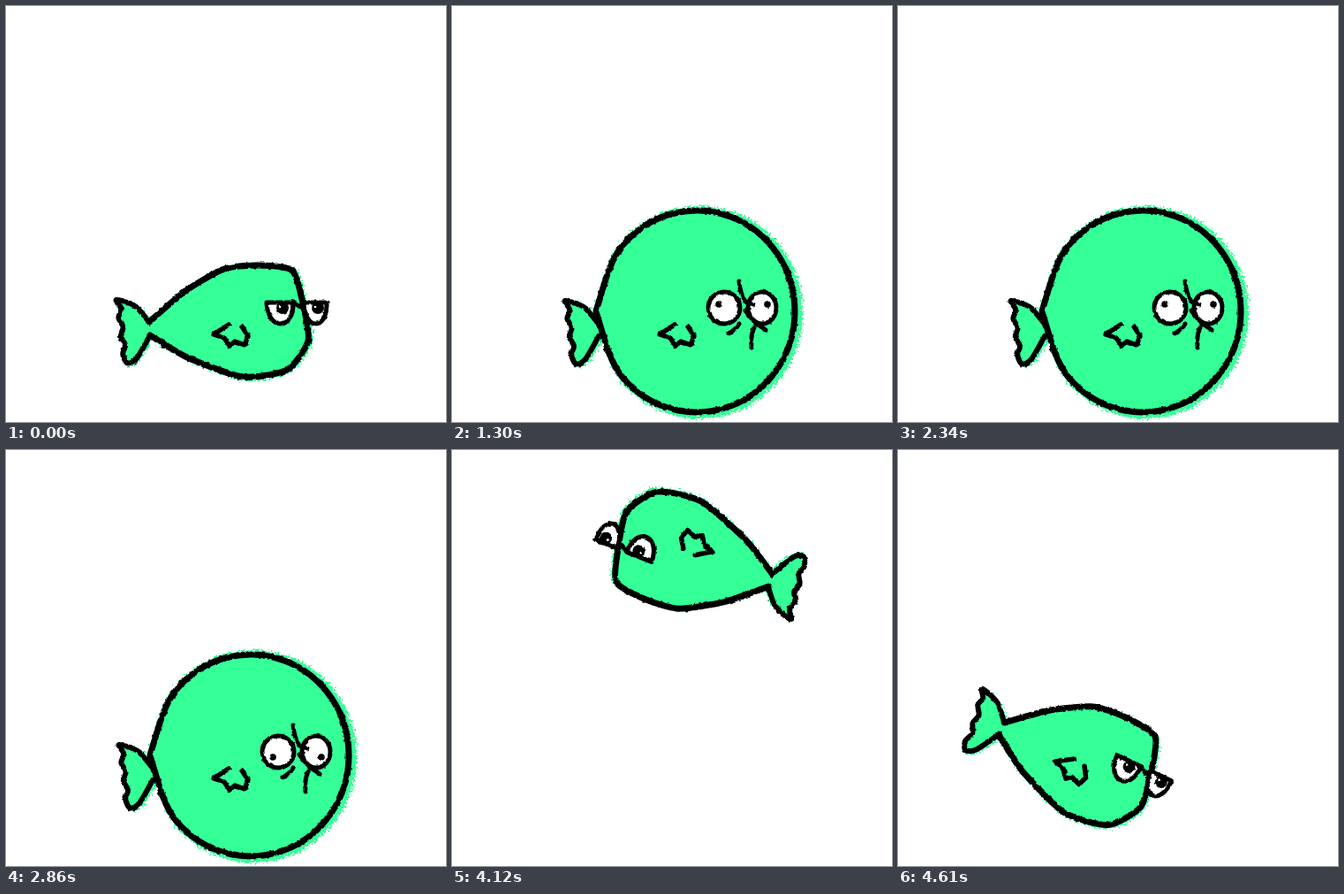
Write an HTML page that moves like this. It is 498x470 px and loops after 4.68 s.

```html
<!DOCTYPE html>
<html lang="en">
<head>
<meta charset="utf-8">
<title>Puffing fish</title>
<style>
html, body { margin: 0; width: 100%; height: 100%; overflow: hidden; background: #fff; }
svg { display: block; }
</style>
</head>
<body>
<svg width="498" height="470" viewBox="0 0 498 470">
  <defs>
    <filter id="fuzz" filterUnits="userSpaceOnUse" x="0" y="0" width="498" height="470" color-interpolation-filters="sRGB">
      <feTurbulence type="fractalNoise" baseFrequency=".4" numOctaves="2"/>
      <feDisplacementMap in="SourceGraphic" scale="11" xChannelSelector="R" yChannelSelector="G"/>
    </filter>
    <filter id="ink" filterUnits="userSpaceOnUse" x="0" y="0" width="498" height="470" color-interpolation-filters="sRGB">
      <feTurbulence type="fractalNoise" baseFrequency=".2" numOctaves="2"/>
      <feDisplacementMap in="SourceGraphic" scale="3" xChannelSelector="R" yChannelSelector="G"/>
    </filter>
  </defs>
  <g filter="url(#fuzz)"><g id="paint"></g></g>
  <g filter="url(#ink)" stroke-linecap="round" stroke-linejoin="round"><g id="lines"></g></g>
</svg>
<script>
const GREEN = '#35ff97', LOOP = 4680, FLIGHT = 3770, REST_STEPS = 29, FLIGHT_STEPS = 13;
const $ = id => document.getElementById(id);
const RAD = Math.PI / 180;

// Clockwise from the upper to the lower tail joint.
const slimBody = [[162,357], [203,322], [247,297], [286,293], [324,299], [336,336],
  [342,378], [318,411], [268,419], [205,397], [163,372]];
const puffBody = slimBody.map((_, i) => {
  const a = (186 + 348 * i / (slimBody.length - 1)) * RAD;
  return [277 + 111 * Math.cos(a), 345 + 114 * Math.sin(a)];
});
const frill = Array.from({ length: 8 }, (_, i) => [126 + 1.2 * i + (i % 2 ? 3 : -1), 332 + 10.2 * i]);
const tailPoints = [[162,357], [146,339], ...frill, [148,398], [163,372]];

const mix = (a, b, k) => a + (b - a) * k;
const wobble = (pts, amp) => pts.map((p, i) => p.map((v, j) => v + amp * Math.sin(i * 5.3 + j * 2.1 + 1)));

function curve(pts, closed, ease = 1 / 7) {
  const n = pts.length;
  const at = i => closed ? pts[(i + n) % n] : pts[Math.max(0, Math.min(n - 1, i))];
  let d = 'M' + pts[0];
  for (let i = 0; i < n - !closed; i++) {
    const [a, b, c, e] = [at(i - 1), at(i), at(i + 1), at(i + 2)];
    const p = b.map((v, j) => v + (c[j] - a[j]) * ease);
    const q = c.map((v, j) => v - (e[j] - b[j]) * ease);
    d += `C${p} ${q} ${c}`;
  }
  return d + (closed ? 'Z' : '');
}

const path = (d, width, fill = 'none', stroke = '#000') =>
  `<path d="${d}" fill="${fill}" stroke="${stroke}" stroke-width="${width}"/>`;
const dot = (x, y, r, fill = '#000') => `<circle cx="${x}" cy="${y}" r="${r}" fill="${fill}"/>`;

const sleepyEye = (x, r) =>
  path(`M${x - r} 335H${x + r}C${x + r + 1} 367 ${x - r + 1} 367 ${x - r} 335Z`, 5, '#fff') +
  dot(x + 3, 341, 7) + dot(x, 340, 1.3, '#fff');

const slimFace = () => sleepyEye(310, 15) + sleepyEye(350, 13) + path('M325 335L333 340L338 335', 5);

function puffFace(down) {
  const eye = (x, r, look) => `<ellipse cx="${x}" cy="341" rx="${r}" ry="18" fill="#fff" stroke="#000" stroke-width="5"/>` +
    dot(x + look, down ? 347 : 337, 3.8);
  return eye(308, 18, -6) + eye(351, 16, 6) +
    path('M325 311Q326 325 332 334L341 337M332 344Q340 356 355 366M345 358Q337 369 339 386M325 359Q321 366 313 370', 5);
}

// One counter-clockwise lap; the fish heads along its path.
function flight(n) {
  const turn = -360 * (n + 1.3) / (FLIGHT_STEPS + 1.3);
  const a = (turn + 90 - 15 * Math.sin(Math.PI * n / FLIGHT_STEPS)) * RAD;
  return `translate(${258 + 170 * Math.cos(a)} ${237 + 112 * Math.sin(a)}) rotate(${turn}) translate(-245 -355)`;
}

function draw(step) {
  const boil = step % 2, flying = step >= REST_STEPS;
  const p = flying ? 0 : Math.max(0, Math.min(1, (step - 6) / 3));
  const puff = p * p * (3 - 2 * p), full = puff > .5;

  const outline = slimBody.map((pt, i) => pt.map((v, j) => mix(v, puffBody[i][j], puff)));
  const body = wobble(outline, boil * (1 + puff));
  const tail = wobble(tailPoints.map(([x, y]) => [x + 3 * puff, y + puff]), boil);
  const ease = mix(1 / 9, 1 / 5.6, puff);
  const whole = curve(body, true, ease), flap = curve(tail, true);

  const move = flying ? flight(step - REST_STEPS) : '';
  $('paint').setAttribute('transform', move + `translate(${2 + puff} 1)`);
  $('lines').setAttribute('transform', move);
  $('paint').innerHTML = path(whole, 6 + 6 * puff, GREEN, GREEN) + path(flap, 4, GREEN, GREEN);
  $('lines').innerHTML = path(whole, 0, GREEN, 'none') + path(flap, 0, GREEN, 'none') +
    path(curve(tail), 6) + path(curve(body, full, ease), 7) +
    `<g transform="translate(${-boil} ${boil})">` +
    path('M252 360L235 371L247 375L253 384L259 379L270 383L274 373L267 362', 5.5) +
    (full ? puffFace(step >= 20 && step < 25) : slimFace()) + '</g>';
  document.querySelectorAll('feTurbulence').forEach(f => f.setAttribute('seed', 3 + boil * 4));
}

let shown = -1;
function tick() {
  const t = performance.now() % LOOP;
  const step = t < FLIGHT ? Math.floor(t / 130) : REST_STEPS + Math.floor((t - FLIGHT) / 70);
  if (step !== shown) draw(shown = step);
  requestAnimationFrame(tick);
}
tick();
</script>
</body>
</html>
```
